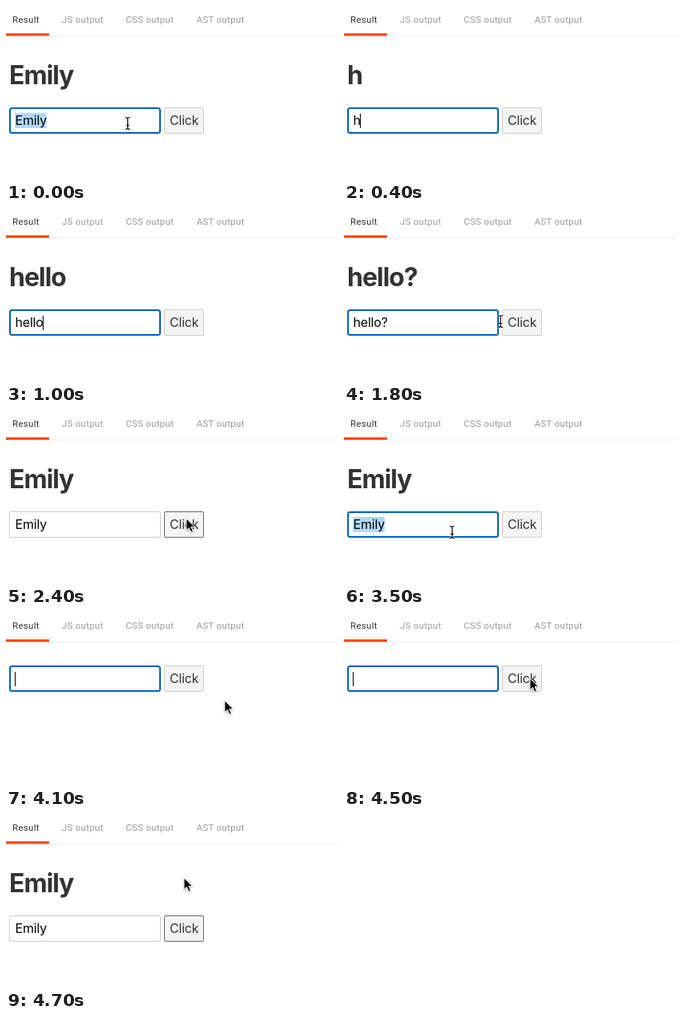
An HTML page that plays this animation: 416x218 px, repeating every 4900 ms.

```html
<!DOCTYPE html>
<html lang="en">
<head>
<meta charset="utf-8">
<title>Input binding demo</title>
<style>
  html, body { margin: 0; width: 100%; height: 100%; overflow: hidden; background: #fff; }
  svg { display: block; width: 416px; height: 218px; }
  text { font: 16px Inter, sans-serif; letter-spacing: -.2px; fill: #333; white-space: pre; }
  .tab { font: 11.5px Roboto, sans-serif; letter-spacing: .3px; fill: #999; }
  .tab.active { fill: #333; }
  #heading { font-size: 32px; font-weight: 700; letter-spacing: -1px; }
  #value { fill: #000; }
  #arrow { filter: drop-shadow(0 1px 1px rgba(0, 0, 0, .35)); }
</style>
</head>
<body>
<svg viewBox="0 0 416 218">
  <defs>
    <path id="beamShape" d="M-3 -7.5Q0 -7.5 0 -5.5Q0 -7.5 3 -7.5M0 -5.5V5.5M-3 7.5Q0 7.5 0 5.5Q0 7.5 3 7.5M-2 2.5H2"/>
  </defs>
  <path d="M0 37.5H416" stroke="#eee"/>
  <rect y="34.3" width="54" height="3" fill="#ff3e00"/>
  <text class="tab active" x="8" y="21">Result</text>
  <text class="tab" x="70" y="21">JS output</text>
  <text class="tab" x="150" y="21">CSS output</text>
  <text class="tab" x="238.7" y="21">AST output</text>
  <text id="heading" x="4" y="98"></text>
  <g id="form">
    <rect id="field" fill="#fff"/>
    <rect id="selection" x="11" y="7" height="19" fill="#b3d7ff"/>
    <text id="value" x="11.5" y="22"></text>
    <path id="caret" stroke="#000"/>
    <rect id="button" x="198.5" y=".5" width="49" height="32" rx="1.5" fill="#f4f4f4"/>
    <text x="205" y="22">Click</text>
  </g>
  <path id="arrow" d="M0 0V14.5L3.4 11.4L5.8 17L8.4 15.9L6 10.5H10.8Z" stroke="#fff" stroke-linejoin="round"/>
  <g id="beam" fill="none">
    <use href="#beamShape" stroke="#fff" stroke-width="2.6"/>
    <use href="#beamShape" stroke="#000" stroke-width="1.2"/>
  </g>
</svg>
<script>
const DURATION = 4900;
const NAME = 'Emily';
const $ = id => document.getElementById(id);

// Each list holds [start time, value...]; a value stays until the next entry.
const texts = [
  [0, NAME], [300, 'h'], [600, 'he'], [700, 'hel'], [800, 'hell'],
  [1000, 'hello'], [1300, 'hello?'], [2400, NAME], [3700, ''], [4700, NAME]
];
const modes = [
  [0, 'selected'], [300, 'caret'], [1800, 'focus'], [2400, 'button'],
  [3400, 'caret'], [3500, 'selected'], [3700, 'caret'], [4600, 'button']
];
const pointers = [
  [0, 'beam', 152.5, 147], [400, 'none', 0, 0],
  [1800, 'beam', 196, 142], [1900, 'arrow', 230, 146], [2000, 'arrow', 262, 146],
  [2100, 'arrow', 278, 145], [2200, 'arrow', 262, 142], [2300, 'arrow', 236, 138],
  [2400, 'arrow', 226, 136],
  [2900, 'arrow', 221, 139], [3000, 'arrow', 205, 145], [3100, 'beam', 180, 153],
  [3200, 'beam', 155, 157], [3300, 'beam', 140, 155], [3400, 'beam', 135.5, 153],
  [3700, 'none', 0, 0],
  [4100, 'arrow', 274, 111], [4200, 'arrow', 291, 108], [4300, 'arrow', 283, 100],
  [4400, 'arrow', 258, 90], [4500, 'arrow', 233, 83], [4600, 'arrow', 223, 80]
];

const at = (track, t) => track.findLast(entry => entry[0] <= t).slice(1);
const set = (id, attrs) => {
  for (const key in attrs) $(id).setAttribute(key, attrs[key]);
};
const show = (id, visible) => set(id, { visibility: visible ? 'visible' : 'hidden' });

function render(t) {
  const [text] = at(texts, t);
  const [mode] = at(modes, t);
  const [pointer, x, y] = at(pointers, t);

  $('heading').textContent = $('value').textContent = text;
  set('form', { transform: `translate(0 ${text ? 127 : 67})` });

  const focused = mode !== 'button';
  set('field', focused
    ? { x: 5, y: 1, width: 188, height: 31, rx: 2.5, stroke: '#0060c0', 'stroke-width': 2 }
    : { x: 4.5, y: .5, width: 189, height: 32, rx: 1.5, stroke: '#ccc', 'stroke-width': 1 });
  set('button', { stroke: focused ? '#ccc' : '#666' });

  const width = text ? $('value').getComputedTextLength() : 0;
  set('selection', { width: width + .5 });
  show('selection', mode === 'selected');
  set('caret', { d: `M${Math.round(11 + width) + .5} 8V26` });
  show('caret', mode === 'caret');

  for (const id of ['arrow', 'beam']) {
    show(id, id === pointer);
    set(id, { transform: `translate(${x} ${y})` });
  }
}

function tick() {
  render(performance.now() % DURATION);
  requestAnimationFrame(tick);
}
tick();
</script>
</body>
</html>
```
